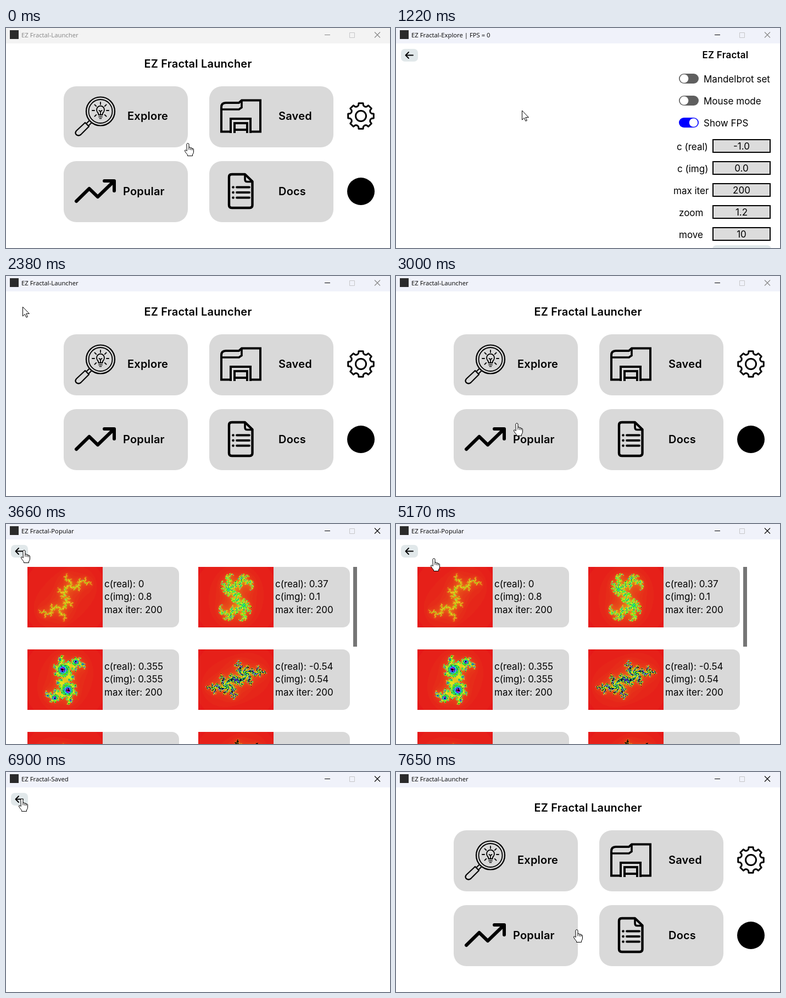
Animation of 699 by 400 pixels, one loop 7.72 s. Source, as an HTML page with a canvas:

```html
<!DOCTYPE html>
<html lang="en">
<head>
<meta charset="utf-8">
<title>EZ Fractal</title>
<style>
html, body { margin: 0; width: 100%; height: 100%; overflow: hidden; background: #fff; }
canvas { display: block; width: 699px; height: 400px; }
</style>
</head>
<body>
<canvas id="stage" width="699" height="400"></canvas>
<script>
const ctx = document.getElementById('stage').getContext('2d');
const LOOP = 7720;
const LOAD = 70; // a page stays blank this long after it opens
const GREY = '#d9d9d9';

const scenes = [
  [0, 'Launcher', launcher],
  [870, 'Explore | FPS = 0', explore],
  [2310, 'Launcher', launcher],
  [3130, 'Popular', popular],
  [5240, 'Launcher', launcher],
  [6110, 'Saved', backButton],
  [7170, 'Launcher', launcher]
];

// pointer legs: start, end, x, y; it rests in between
const legs = [
  [70, 800, 240, 158], [800, 1220, 229, 150], [1290, 1630, 27, 46],
  [1760, 2040, 29, 46], [2240, 2310, 30, 56], [2450, 3060, 240, 290],
  [3130, 3460, 34, 47], [3650, 3660, 33, 47], [4180, 4250, 27, 48],
  [4640, 4710, 27, 55], [4910, 5170, 69, 62], [5240, 5580, 467, 142],
  [6180, 6570, 10, 46], [6770, 6900, 29, 48], [7370, 7650, 329, 286]
];

function text(str, x, y, font, align = 'left', color = '#000', spacing = 0) {
  ctx.font = font;
  ctx.textAlign = align;
  ctx.letterSpacing = spacing + 'px';
  ctx.fillStyle = color;
  ctx.fillText(str, x, y);
}
const body = (str, x, y, align) => text(str, x, y, '17px Inter, sans-serif', align);
const strong = (str, x, y, size, align) =>
  text(str, x, y, `600 ${size}px Inter, sans-serif`, align, '#000', 0.2);

function box(x, y, w, h, r, color) {
  ctx.fillStyle = color;
  ctx.beginPath();
  ctx.roundRect(x, y, w, h, r);
  ctx.fill();
}
function disc(x, y, r, color) {
  ctx.fillStyle = color;
  ctx.beginPath();
  ctx.arc(x, y, r, 0, 7);
  ctx.fill();
}
function line(d, width, color = '#000', join = 'round') {
  ctx.strokeStyle = color;
  ctx.lineWidth = width;
  ctx.lineJoin = join;
  ctx.lineCap = join === 'round' ? 'round' : 'butt';
  ctx.stroke(new Path2D(d));
}
function ring(x, y, r, width) {
  ctx.strokeStyle = '#000';
  ctx.lineWidth = width;
  ctx.beginPath();
  ctx.arc(x, y, r, 0, 7);
  ctx.stroke();
}

function windowBar(name, t) {
  const idle = t < 730;
  ctx.fillStyle = idle ? '#f3f3f3' : '#f0f2fa';
  ctx.fillRect(0, 0, 699, 28);
  ctx.fillStyle = '#2b2b2b';
  ctx.fillRect(7, 4, 16, 16);
  text('EZ Fractal-' + name, 28, 17, '11.3px "Open Sans", sans-serif', 'left', idle ? '#858585' : '#000');
  line('M580 12.5h10', 1, idle ? '#858585' : '#000', 'miter');
  line('M625.5 8.5h9v9h-9z', 1, '#c6c6c8', 'miter');
  line('M671 7.5l10 10m0 -10l-10 10', 1.1, t < 3130 ? '#858585' : '#000', 'miter');
}

function magnifier() {
  ring(172, 151.5, 26, 2.2);
  ring(172, 151.5, 21.5, 1.8);
  line('M151 169l-5 5m9 -1l-5 5', 2);
  line('M144 172L128 187Q125 191 128 194Q132 197 136 194L151 179Z', 2.2);
  line('M168.5 158q0 -3 -2 -5a7 7 0 1 1 11 0q-2 2 -2 5z', 1.8);
  line('M169 161.5h6m-4.5 3h3M172 157v-6m-2.5 -1l2.5 2l2.5 -2', 1.7);
  let rays = '';
  for (let i = 0; i < 7; i++) {
    const a = Math.PI * (i + 3) / 4;
    const c = Math.cos(a), s = Math.sin(a);
    rays += `M${172 + 11 * c} ${150 + 11 * s}l${4 * c} ${4 * s}`;
  }
  line(rays, 1.8);
}

function folder() {
  line('M409 188.5H392V144Q392 136 400 136H424L429 131.5H463V188.5H445', 4, '#000', 'miter');
  line('M392 148H424L429 144.5V132', 3.6, '#000', 'miter');
  line('M409 191V165H445V191M416 191V173H439V191M416 185H439', 4, '#000', 'miter');
}

function sheet() {
  line('M411 266h24l13.5 13v43q0 5 -5 5h-32.500q-5 0 -5 -5v-51q0 -5 5 -5z', 4.4);
  line('M435 267v8q0 4.5 4 4.5h9', 3.6);
  for (let y = 289.5; y < 310; y += 9.5) {
    disc(413.5, y, 2.3, '#000');
    line(`M420 ${y}h23`, 3.8);
  }
}

function gear(x, y) {
  const side = [[0.36, 18.5], [0.23, 19.8], [0.17, 23.6]];
  const tooth = [...side.map(([a, r]) => [-a, r]), ...side.reverse()];
  const points = [];
  for (let i = 0; i < 8; i++) {
    for (const [da, r] of tooth) {
      const a = i * Math.PI / 4 + da;
      points.push(`${x + r * Math.cos(a)} ${y + r * Math.sin(a)}`);
    }
  }
  line(`M${points.join('L')}Z`, 3);
  ring(x, y, 9.5, 3);
}

function launcher() {
  strong('EZ Fractal Launcher', 349.5, 72, 20, 'center');
  for (const x of [105, 370])
    for (const y of [106, 242]) box(x, y, 226, 111, 23, GREY);
  magnifier();
  folder();
  line('M128 315L151.5 292L167 307L196 279M179 278H197V296', 6);
  sheet();
  strong('Explore', 221, 167, 20);
  strong('Saved', 496, 167, 20);
  strong('Popular', 213, 304, 20);
  strong('Docs', 496, 304, 20);
  gear(646, 160);
  disc(646, 297, 25, '#000');
}

function backButton() {
  box(9, 38, 31, 23, 7, '#e1e8ea');
  line('M17.5 49.5h13.5m-8 -5.5l-5.5 5.5l5.5 5.5', 1.9);
}

function explore() {
  backButton();
  strong('EZ Fractal', 599.5, 55, 17, 'center');
  ['Mandelbrot set', 'Mouse mode', 'Show FPS'].forEach((label, i) => {
    const y = 92 + 40 * i, on = i === 2;
    box(515, y - 9, 36, 18, 9, on ? '#00f' : '#5f5f5f');
    disc(on ? 541.5 : 524.5, y, 7.8, '#fff');
    body(label, 560, y + 7);
  });
  const fields = [['c (real)', '-1.0', 511], ['c (img)', '0.0', 512], ['max iter', '200', 505],
    ['zoom', '1.2', 515], ['move', '10', 515]];
  fields.forEach(([label, value, x], i) => {
    const y = 202 + 40 * i;
    body(label, x, y + 20);
    box(577, y + 1, 104, 23, 0, '#dcdcdc');
    line(`M577 ${y + 1}h104v23h-104z`, 2, '#000', 'miter');
    body(value, 629, y + 19, 'center');
  });
  box(576, 395, 107, 24, 7, '#e1e8ea');
}

function julia(re, im) {
  const w = 137, h = 110, scale = 39.2, limit = 200;
  const pic = document.createElement('canvas');
  pic.width = w;
  pic.height = h;
  const g = pic.getContext('2d');
  for (let py = 0; py < h; py++) {
    for (let px = 0; px < w; px++) {
      let x = (px - w / 2) / scale, y = (py - h / 2) / scale, n = 0;
      while (n < limit && x * x + y * y <= 4) {
        [x, y] = [x * x - y * y + re, 2 * x * y + im];
        n++;
      }
      g.fillStyle = n === limit ? '#000' : `hsl(${360 * n / limit}, 80%, 50%)`;
      g.fillRect(px, py, 1, 1);
    }
  }
  return pic;
}

const cards = [[0, 0.8], [0.37, 0.1], [0.355, 0.355], [-0.54, 0.54], [-0.70176, -0.3842], [-0.123, 0.745]]
  .map(([re, im]) => ({ re, im, pic: julia(re, im) }));

function popular() {
  backButton();
  cards.forEach(({ re, im, pic }, i) => {
    const x = 39 + 311 * (i % 2), y = 78 + 150 * Math.floor(i / 2);
    box(x, y, 276, 110, [0, 13, 13, 0], GREY);
    ctx.drawImage(pic, x, y);
    body('c(real): ' + re, x + 140, y + 37);
    body('c(img): ' + im, x + 140, y + 60);
    body('max iter: 200', x + 140, y + 84);
  });
  ctx.fillStyle = '#757575';
  ctx.fillRect(632, 78, 7, 145);
}

const ARROW = 'M.5 .5V17L4.3 13.4L7 19.3L9.4 18.2L6.8 12.5H12Z';
const HAND = 'M-2 2Q0 -1 2 2V8Q4.5 7 5.2 9Q7.6 8.2 8 10.2Q10.5 9.6 10.5 12V16' +
  'Q10.5 19 8.5 21V23.5H-.5V21.5Q-3 19 -5.3 15Q-6.5 11 -2 14.2Z';

function position(t) {
  let x = 331, y = 209;
  for (const [start, end, toX, toY] of legs) {
    const p = Math.min(1, Math.max(0, (t - start) / (end - start)));
    x += (toX - x) * p;
    y += (toY - y) * p;
  }
  return [Math.round(x), Math.round(y)];
}

function overButton(page, x, y) {
  if (page !== launcher) return x >= 9 && x <= 40 && y >= 38 && y <= 61;
  const column = (x >= 105 && x <= 331) || (x >= 370 && x <= 596);
  const row = (y >= 106 && y <= 217) || (y >= 242 && y <= 353);
  return column && row;
}

function pointer(t, page, ready) {
  const [x, y] = position(t);
  // the hand lingers while the launcher is being opened
  const lingers = (t >= 4910 && t < 5240) || (t >= 7170 && t < 7400);
  const hand = lingers || (ready && overButton(page, x, y));
  const shape = hand ? HAND : ARROW;
  ctx.save();
  ctx.translate(x, y);
  ctx.fillStyle = '#fff';
  ctx.fill(new Path2D(shape));
  line(shape, 1);
  if (hand) line('M2 8v4m3.2 -2.500v3m2.800 -2v2.500', 1);
  ctx.restore();
}

function frame(t) {
  const [start, name, page] = scenes.filter(s => s[0] <= t).pop();
  const ready = start === 0 || t >= start + LOAD;
  ctx.fillStyle = '#fff';
  ctx.fillRect(0, 0, 699, 400);
  windowBar(name, t);
  if (ready) page();
  pointer(t, page, ready);
}

const begin = performance.now();
function tick() {
  frame((performance.now() - begin) % LOOP);
  requestAnimationFrame(tick);
}
tick();
</script>
</body>
</html>
```
